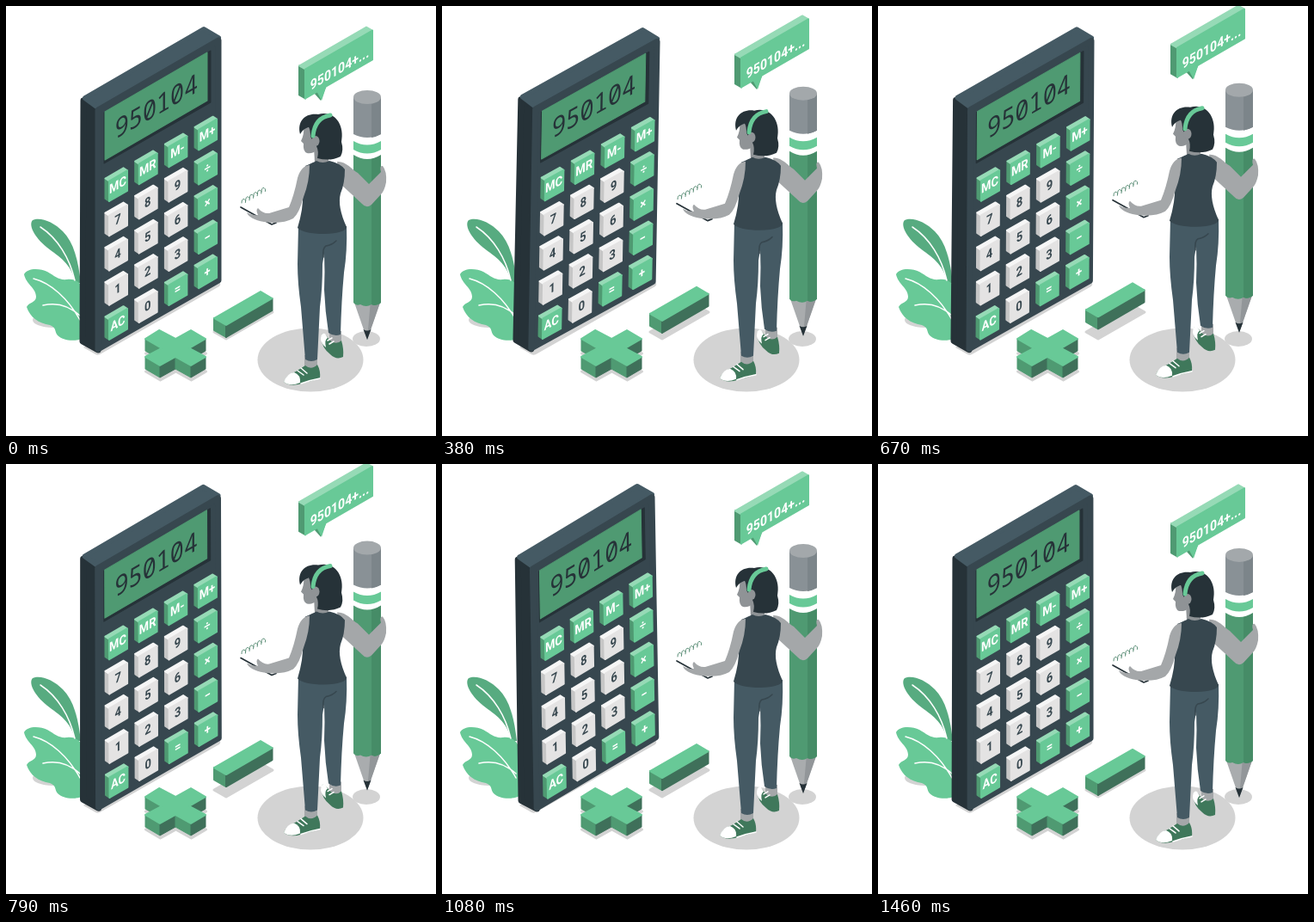
An HTML page that plays this animation: 500 by 500 pixels, repeating every 1.5 s.

```html
<!DOCTYPE html>
<html lang="en">
<head>
<meta charset="utf-8">
<title>Calculator</title>
<style>
  html, body { margin: 0; width: 100%; height: 100%; overflow: hidden; background: #fff; }
  svg { display: block; width: 100%; height: 100%; }
  text { font-family: Roboto, sans-serif; font-weight: 700; text-anchor: middle; }
  .lcd { font-family: "Noto Sans Mono", monospace; font-weight: 300; }
  .line { fill: none; stroke-linecap: round; stroke-linejoin: round; }
</style>
</head>
<body>
<svg viewBox="0 0 500 500">
  <g id="shadows" fill="#d3d3d3">
    <ellipse cx="354" cy="411.500" rx="61.500" ry="37"/>
    <ellipse cx="419" cy="387" rx="16" ry="9"/>
    <ellipse cx="54" cy="365" rx="23" ry="9"/>
    <path d="M90 397L104 405Q107 407 111 404L248 326Q251 323 247 320L230 310Z"/>
  </g>

  <g id="leaves">
    <path fill="#57ab80" d="M81 322C75 298 62 292 48 281C32 268 26 254 31 249C40 245 55 251 66 262C79 275 84 296 87 322Z"/>
    <path fill="#68c997" d="M21 312C25 304 40 305 48 309C57 314 61 319 71 318C81 317 86 321 90 330V386C80 391 66 389 60 383C56 378 59 374 51 371C38 369 28 362 24 350C27 344 35 345 35 338C35 328 23 323 21 312Z"/>
    <path class="line" stroke="#fff" stroke-width="1.500" d="M40 257C60 270 74 293 80 319M32 317C52 322 72 340 86 365M43 348C60 344 74 349 86 360"/>
  </g>

  <g id="calculator"></g>
  <g id="plus"></g>
  <g id="minus"></g>

  <g id="person">
    <g id="pencil">
      <path fill="#a9acae" d="M404 342L420 388L436 342Z"/>
      <path fill="#929699" d="M424 342L420 388L436 342Z"/>
      <path fill="#263238" d="M415.500 376Q420 379 424.500 376L420 388Z"/>
      <path fill="#4f9a72" d="M404 170H436V345Q430 350 425 347Q419 351 412 347Q407 349 404 345Z"/>
      <path fill="#468c67" d="M425 170H436V345Q430 350 425 347Z"/>
      <path fill="#fff" d="M404 146H436V173Q420 183 404 173Z"/>
      <path fill="#68c997" d="M404 157Q420 166 436 157V167Q420 176 404 167Z"/>
      <path fill="#899196" d="M404 106H436V149Q420 157 404 149Z"/>
      <path fill="#7c858a" d="M425 106H436V149Q431 152 425 153Z"/>
      <ellipse cx="420" cy="106" rx="16" ry="8" fill="#a3a8ab"/>
    </g>

    <g fill="#a4a7a9">
      <path d="M385 181C395 180 402 190 409 194L422 207L436 193Q434 185 438 186Q443 192 442 205Q440 215 436 219L425 231Q419 236 414 230L389 207Z"/>
      <path d="M347 406H362V421Q355 426 347 421Z"/>
      <path d="M376 378H390V395Q382 398 376 390Z"/>
    </g>

    <g id="shoes">
      <path fill="#3f785b" d="M367 387Q366 379 371 382L378 390Q385 394 390 389Q393 399 392 408Q384 412 377 405Q367 397 367 387Z"/>
      <path fill="#fff" d="M366 388Q366 379 371 381L374 386Q370 388 372 397Q367 393 366 388Z"/>
      <path fill="#3f785b" d="M348 418Q355 424 362 417Q366 424 365 433Q356 436 347 438Q331 444 323 437Q326 429 337 425Z"/>
      <path fill="#fff" d="M323 437Q327 427 335 426Q343 429 342 438Q330 443 323 437Z"/>
      <path class="line" stroke="#fff" stroke-width="1.500" d="M339 424L346 429M343 421L350 427M374 389L379 386M376 393L381 390M343 439Q354 435 365 433"/>
    </g>

    <path fill="#455a64" d="M340 256L339 300Q339 322 343 350L348 411Q355 415 362 411L365 350Q368 328 368 300L370 288Q371 308 370 330Q371 355 375 380Q382 385 389 382Q390 342 393 310Q397 285 396 256Z"/>
    <path class="line" stroke="#37474f" stroke-width="1.500" d="M369 292Q368 281 372 279Q379 278 384 273"/>
    <path fill="#8f9396" d="M358 164H375V183Q367 187 359 182Z"/>
    <path fill="#37474f" d="M348 186Q357 182 361 180Q368 184 376 180Q389 183 394 190Q394 206 389 218Q385 233 396 257Q395 264 370 265Q346 265 339 258Q346 235 345 218Z"/>

    <path fill="#fff" d="M273 233L300 216L318 240L311 253Z"/>
    <path class="line" stroke="#263238" stroke-width="1.700" d="M273 234L309 254L314 252"/>
    <path id="rings" class="line" stroke="#5c8f78" stroke-width="1"/>
    <path fill="#a4a7a9" d="M353 185Q343 186 339 200Q335 220 329 234L306 241Q299 242 293 235Q290 237 293 243Q286 244 280 240Q283 248 300 251Q321 254 334 247Q341 241 346 222Q353 204 353 185Z"/>

    <g id="head">
      <path fill="#8f9396" d="M346 141Q347 149 343 157L346 160Q345 169 350 171Q357 172 362 167L370 142Z"/>
      <path fill="#263238" d="M342 149C338 133 349 124 363 126C382 121 394 138 390 158Q393 168 389 175Q377 181 362 177Q364 169 361 163L354 152Q354 144 352 141Q346 142 342 149Z"/>
      <ellipse cx="360" cy="157" rx="4.500" ry="6" fill="#8f9396"/>
      <path class="line" stroke="#68c997" stroke-width="5" stroke-linecap="butt" d="M377 127Q359 130 357 151"/>
    </g>
  </g>

  <g id="bubble">
    <path fill="#4f9a72" d="M357 100L366 110L373 92Z"/>
    <path fill="#68c997" d="M361 99L367 110L373 92Z"/>
  </g>
</svg>
<script>
const GREEN = '#68c997', MID = '#4f9a72', DEEP = '#3f705a', PALE = '#96dab6';
const $ = id => document.getElementById(id);
const add = (id, markup) => $(id).insertAdjacentHTML('beforeend', markup);

// Polygon with slightly rounded corners
const poly = (fill, points, round = 1) =>
  `<polygon points="${points}" fill="${fill}" stroke="${fill}" stroke-width="${round}" stroke-linejoin="round"/>`;

// Text lying on the isometric wall
const wallText = (label, x, y, size, fill, cls = '') =>
  `<text class="${cls}" transform="matrix(.866 -.5 0 1 ${x} ${y})" y="${size * .36}" font-size="${size}" fill="${fill}">${label}</text>`;

// Slab with a left side, a top and a front face; x, y is the front's upper left corner
const slab = (x, y, w, h, dx, dy, [front, left, top]) => {
  const rise = w * .577;
  return poly(left, [x, y, x - dx, y - dy, x - dx, y + h - dy, x, y + h], 2) +
    poly(top, [x, y, x + w, y - rise, x + w - dx, y - rise - dy, x - dx, y - dy], 2) +
    poly(front, [x, y, x + w, y - rise, x + w, y + h - rise, x, y + h], 2);
};

function buildCalculator() {
  add('calculator',
    poly('#263238', [90, 110, 107, 119, 107, 400, 89, 390], 7) +
    poly('#455a64', [92, 107, 230, 27, 247, 37, 107, 118], 6) +
    poly('#37474f', [107, 121, 247, 40, 247, 319, 107, 399], 7) +
    poly('#263238', [114, 124, 238, 52, 238, 112, 114, 183]) +
    poly(MID, [115, 123, 234, 54, 234, 110, 115, 179]) +
    wallText('950104', 175, 116, 31, '#263238', 'lcd'));
  const rows = ['MC MR M- M+', '7 8 9 ÷', '4 5 6 ×', '1 2 3 −', 'AC 0 = +'];
  rows.forEach((row, j) => row.split(' ').forEach((label, i) => {
    const x = 129.5 + 34.7 * i, y = 207.5 - 19.9 * i + 40.2 * j;
    const digit = /\d/.test(label);
    const colors = digit ? ['#e4e3e3', '#c6c6c6', '#f6f6f6'] : [GREEN, MID, PALE];
    add('calculator', slab(x - 9.5, y - 4, 21, 23.5, 4.5, 3, colors) +
      wallText(label, x + .5, y, 15, digit ? '#37474f' : '#fff'));
  }));
}

function buildPlus() {
  const top = [[178, 377], [197, 387], [215, 377], [232, 387], [213, 398], [232, 408],
    [215, 418], [197, 408], [179, 418], [162, 408], [181, 398], [162, 387]];
  const side = (a, b, fill) => {
    const [[x1, y1], [x2, y2]] = [top[a], top[b]];
    return poly(fill, [x1, y1, x2, y2, x2, y2 + 14, x1, y1 + 14]);
  };
  add('shadows', poly('#d3d3d3', top.map(([x, y]) => [x + .5, y + 17]), 3));
  add('plus', side(11, 10, MID) + side(4, 3, DEEP) + side(9, 8, MID) + side(8, 7, DEEP) +
    side(7, 6, MID) + side(6, 5, DEEP) + poly(GREEN, top, 2));
}

function buildMinus() {
  add('shadows', poly('#d3d3d3', [242, 379, 296, 348, 310, 356, 256, 387], 3));
  add('minus', poly(MID, [242, 363, 256, 371, 256, 385, 242, 377], 2) +
    poly(DEEP, [256, 371, 309.5, 340, 309.5, 354, 256, 385], 2) +
    poly(GREEN, [242, 363, 296, 332, 309.5, 340, 256, 371], 2));
}

buildCalculator();
buildPlus();
buildMinus();
add('bubble', slab(348, 73.5, 78, 34, 7, 4, [GREEN, MID, PALE]) +
  wallText('950104+...', 388, 72.5, 16.3, '#fff'));
$('rings').setAttribute('d', Array.from({ length: 6 }, (_, i) =>
  `M${274 + 4.6 * i} ${229 - 2.6 * i}q0 -5 3 -4.500q2.500 1 1.500 4`).join(''));

const LOOP = 1500;
const ease = p => (1 - Math.cos(Math.PI * p)) / 2;
const sway = p => p < .25 ? ease(4 * p) : p < .75 ? 1 - 2 * ease(2 * p - .5) : ease(4 * p - 3) - 1;
const lift = (id, dy) => $(id).setAttribute('transform', `translate(0 ${-dy})`);

function frame(now) {
  const p = now % LOOP / LOOP;
  const float = ease(2 * p);
  lift('bubble', 25.5 * float);
  lift('minus', 10 * float);
  lift('person', 8.5 * float);
  $('calculator').setAttribute('transform', `rotate(${sway(p)} 168 214)`);
  requestAnimationFrame(frame);
}
frame(performance.now());
</script>
</body>
</html>
```
